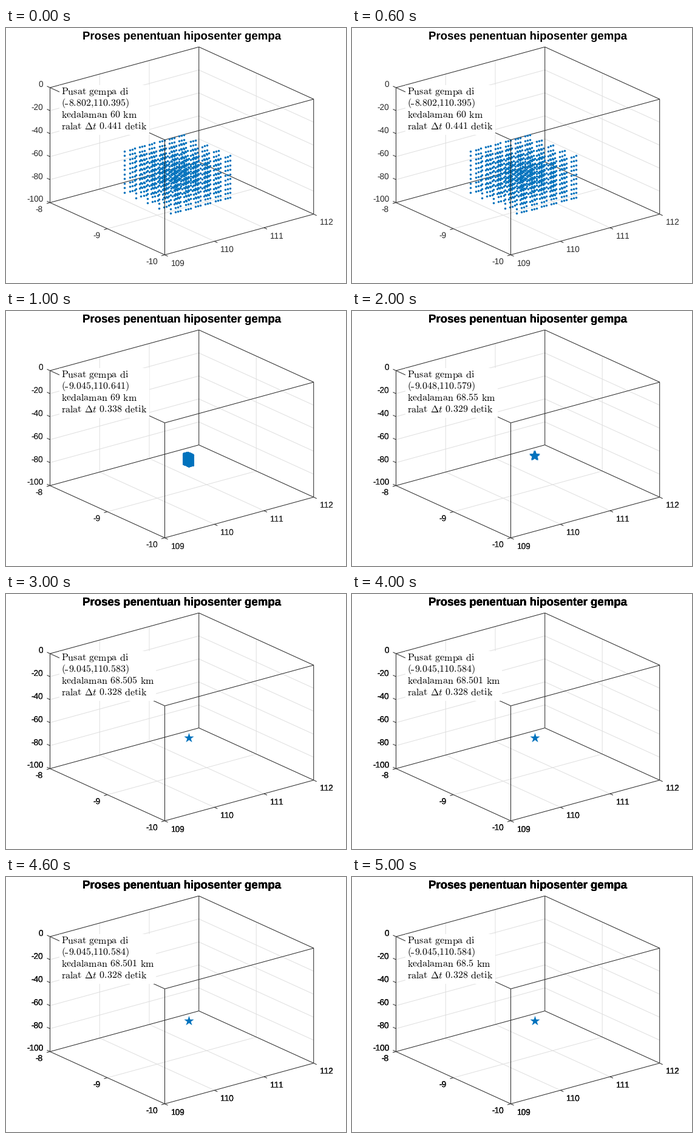
Animation, 560 px wide and 420 px high, one loop 6 s. Source, as a matplotlib script:

```python
import numpy as np
import matplotlib as mpl
import matplotlib.pyplot as plt
from matplotlib.animation import ArtistAnimation
from matplotlib.patches import Rectangle

W, H, DPI = 560, 420, 100
PT = 72 / DPI
BLUE, INK, GRID = "#0072bd", "#262626", "#dfdfdf"

mpl.rcParams.update({
    "mathtext.fontset": "cm",
    "text.hinting": "none",
    "text.kerning_factor": 12,  # unkerned lettering
    "axes.unicode_minus": False,
    "font.family": "Liberation Sans",
})

fig = plt.figure(figsize=(W / DPI, H / DPI), dpi=DPI, facecolor="white")
ax = fig.add_axes([0, 0, 1, 1])
ax.set(xlim=(0, W), ylim=(H, 0))
ax.axis("off")


def project(lat, lon, z):
    """Latitude, longitude and height in km to stage pixels."""
    u, v, w = (-8 - lat) / 2, (lon - 109) / 3, (z + 100) / 100
    return 72.5 + 189 * u + 245.2 * v, 287.6 + 86 * u - 67 * v - 189.4 * w


def line(pts, color=INK, z=1):
    x, y = zip(*pts)
    ax.plot(x, y, color=color, lw=PT, zorder=z, solid_capstyle="butt", snap=False)


def edge(a, b, color=INK, z=1):
    line([project(*a), project(*b)], color, z)


def tick(p, dx, dy):
    x, y = project(*p)
    line([(x, y), (x + dx, y + dy)])


# Grid on the floor and the two back walls
for z in range(-80, 0, 20):
    edge((-8, 109, z), (-8, 112, z), GRID, 0)
    edge((-8, 112, z), (-10, 112, z), GRID, 0)
for lon in (110, 111):
    edge((-8, lon, -100), (-10, lon, -100), GRID, 0)
    edge((-8, lon, -100), (-8, lon, 0), GRID, 0)
edge((-9, 109, -100), (-9, 112, -100), GRID, 0)
edge((-9, 112, -100), (-9, 112, 0), GRID, 0)

# Box
for z in (-100, 0):
    for lat in (-8, -10):
        edge((lat, 109, z), (lat, 112, z))
    for lon in (109, 112):
        edge((-8, lon, z), (-10, lon, z))
for lat in (-8, -10):
    for lon in (109, 112):
        edge((lat, lon, -100), (lat, lon, 0), z=4 if (lat, lon) == (-10, 109) else 1)

# Ticks and their labels
labels = []
for z in range(-100, 1, 20):
    tick((-8, 109, z), -5, -2.3)
    x, y = project(-8, 109, z)
    labels.append((str(z), x - 11, y - 1.3, "right"))
for lat in (-8, -9, -10):
    tick((lat, 109, -100), -5.5, 1.5)
    x, y = project(lat, 109, -100)
    labels.append((str(lat), x - 11.6, y + 15.5, "right"))
for lon in (109, 110, 111, 112):
    tick((-10, lon, -100), 5, 2.3)
    x, y = project(-10, lon, -100)
    labels.append((str(lon), x + 10.2, y + 17.8, "left"))


def lettering():
    """One coat of title and tick labels; coats pile up and darken."""
    coat = [ax.text(289.5, 19, "Proses penentuan hiposenter gempa", ha="center",
                    size=18.6 * PT, weight="bold", color="black")]
    for s, x, y, ha in labels:
        coat.append(ax.text(x, y, s, ha=ha, size=13.6 * PT, color=INK))
    return coat


def roman(s):
    return r"\hspace{0.38}".join(r"\mathrm{%s}" % w for w in s.split())


def note(lat, lon, depth, err, width):
    em, x, y, step = 16, 91, 109.5, 19
    gap = r"\hspace{0.38}"
    rows = [
        (x, 0, roman("Pusat gempa di")),
        (x, 1, r"\mathrm{(}"),
        (x + 0.722 * em, 1, r"\mathrm{%s{,}%s)}" % (lat, lon)),
        (x, 2, roman(f"kedalaman {depth} km")),
        (x, 3, roman("ralat") + gap + r"\Delta t" + gap + roman(f"{err} detik")),
    ]
    art = [
        ax.add_patch(Rectangle((88, 94), width, 82, fc="white", ec="none", zorder=5)),
        ax.add_patch(Rectangle((x + 0.4 * em, y + step - 3.9), 0.265 * em, 1,
                               fc="black", ec="none", zorder=6)),
    ]
    for tx, n, s in rows:
        art.append(ax.text(tx, y + n * step, f"${s}$", size=em * PT, zorder=6))
    return art


def cloud(lat, lon, z, size):
    la, lo, zz = (g.ravel() for g in np.meshgrid(lat, lon, z))
    x, y = project(la, lo, zz)
    return ax.plot(x, y, ls="", marker="o", ms=size * PT, mfc=BLUE,
                   mec="none", zorder=3, snap=False)


def star(x, y, r):
    a = np.arange(10) * np.pi / 5
    rad = np.where(np.arange(10) % 2, 0.382 * r, r)
    return ax.fill(x + rad * np.sin(a), y - rad * np.cos(a), color=BLUE, lw=0, zorder=3)


n = np.arange(10)
# Coarse search: longitudes come in short runs, which read as dashes
runs = [0.2 * k - d for k in range(1, 7) for d in (0, 0.05, 0.1)]
coarse = cloud(-8.6 - 0.2 * np.arange(5), 109.81 + np.array([0] + runs), -51.2 - 4 * n, 3.5)
fine = cloud(-9.0 - 0.01 * n, 110.53 + 0.01 * n, -67.4 - n, 3.2)
blur = [s for dx in (-1, 0, 1) for dy in (-0.8, 0.8) for s in star(301 + dx, 238.5 + dy, 8.4)]
lone = star(301.5, 237.3, 8.5)

points = [coarse, fine, blur, lone, lone, lone]
notes = [
    note("8.802", "110.395", "60", "0.441", 148),
    note("9.045", "110.641", "69", "0.338", 148),
    note("9.048", "110.579", "68.55", "0.329", 152),
    note("9.045", "110.583", "68.505", "0.328", 159),
    note("9.045", "110.584", "68.501", "0.328", 159),
    note("9.045", "110.584", "68.5", "0.328", 148),
]

steps, coats = [], []
for pts, txt in zip(points, notes):
    coats = coats + lettering()
    steps.append(coats + pts + txt)

anim = ArtistAnimation(fig, steps, interval=1000, repeat=True, repeat_delay=0)
plt.show()
```
